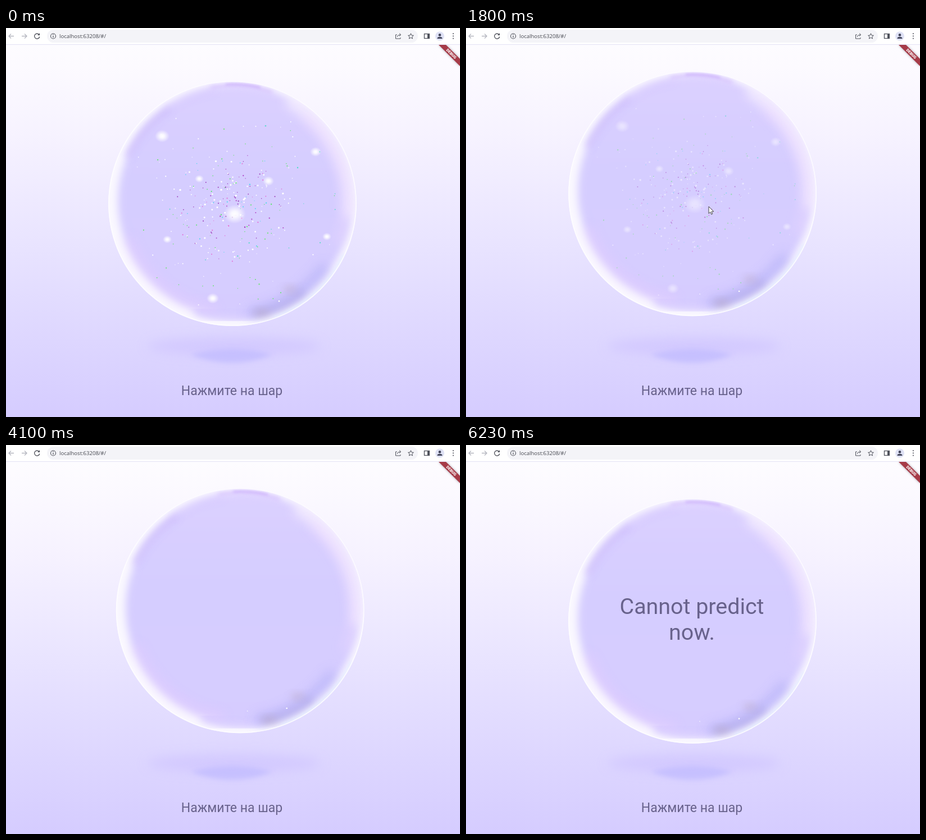
An HTML page that plays this animation: 808 by 693 pixels, repeating every 6260 ms.

```html
<!DOCTYPE html>
<html lang="ru">
<head>
<meta charset="utf-8">
<style>
html, body { margin: 0; width: 100%; height: 100%; overflow: hidden; background: #fff; }
svg { display: block; }
text { font-family: Roboto, sans-serif; }
.bar { fill: none; stroke: #50535c; stroke-width: 1.3; }
</style>
</head>
<body>
<svg width="808" height="693" viewBox="0 0 808 693">
  <defs>
    <linearGradient id="sky" x2="0" y2="1">
      <stop offset="0" stop-color="#fdfcff"/>
      <stop offset=".06" stop-color="#fcfaff"/>
      <stop offset=".25" stop-color="#f6f2ff"/>
      <stop offset=".55" stop-color="#e8e3ff"/>
      <stop offset=".8" stop-color="#ddd6ff"/>
      <stop offset="1" stop-color="#d5ccff"/>
    </linearGradient>
    <linearGradient id="body" x2="0" y2="1">
      <stop offset="0" stop-color="#dbd0ff"/>
      <stop offset=".4" stop-color="#d5cdff"/>
      <stop offset="1" stop-color="#d6ccff"/>
    </linearGradient>
    <radialGradient id="glow">
      <stop offset="0" stop-color="#fff"/>
      <stop offset=".3" stop-color="#fff" stop-opacity=".85"/>
      <stop offset="1" stop-color="#fff" stop-opacity="0"/>
    </radialGradient>
    <filter id="b2" x="-50%" y="-200%" width="200%" height="500%"><feGaussianBlur stdDeviation="2"/></filter>
    <filter id="b4" x="-60%" y="-200%" width="220%" height="500%"><feGaussianBlur stdDeviation="4"/></filter>
    <filter id="b7" x="-60%" y="-60%" width="220%" height="220%"><feGaussianBlur stdDeviation="7"/></filter>
    <filter id="b10" x="-80%" y="-100%" width="260%" height="300%"><feGaussianBlur stdDeviation="10"/></filter>
    <clipPath id="round"><circle r="220"/></clipPath>
    <clipPath id="page"><path d="M0 30H808V693H0Z"/></clipPath>
  </defs>

  <rect y="30" width="808" height="663" fill="url(#sky)"/>

  <!-- browser bar -->
  <rect width="808" height="29" fill="#fff"/>
  <rect y="29" width="808" height="1" fill="#e3e2f5"/>
  <rect x="73" y="3" width="660" height="23" rx="11.5" fill="#f4f4f8"/>
  <g class="bar">
    <path d="M14 14.5H5M9 10.5L5 14.5L9 18.5M28 14.5H37M33 10.5L37 14.5L33 18.5" stroke="#b5b6bf"/>
    <path d="M58.6 11.4A4.6 4.6 0 1 0 59.8 15.5"/>
    <path d="M60 9V13H56Z" fill="#50535c" stroke="none"/>
    <circle cx="84" cy="14.5" r="4.5" stroke-width="1.1"/>
    <path d="M84 14V17M84 11.6V12.8"/>
    <path d="M696 12H693.5V19H702V17M696 16Q697 12 702 12M700 9.5L702.8 12L700 14.5" stroke-width="1"/>
    <path d="M720.5 9.7L721.9 13L725.4 13.3L722.7 15.6L723.6 19L720.5 17.2L717.4 19L718.3 15.6L715.6 13.3L719.1 13Z" stroke-width="1"/>
    <rect x="744.5" y="10.5" width="9" height="8"/>
    <path d="M750 10H754V19H750Z" fill="#50535c" stroke="none"/>
  </g>
  <circle cx="772" cy="14.5" r="8" fill="#dfe2f5"/>
  <path d="M767.5 19Q767.5 15.7 772 15.7T776.5 19Z" fill="#42455a"/>
  <circle cx="772" cy="12.4" r="2.3" fill="#42455a"/>
  <path d="M795 9.3h1.8v1.8h-1.8zm0 4.2h1.8v1.8h-1.8zm0 4.2h1.8v1.8h-1.8z" fill="#50535c"/>
  <text x="95" y="18" fill="#45474f" style="font:9.55px 'Open Sans',sans-serif">localhost:63208/#/</text>

  <!-- shadow on the floor -->
  <ellipse cx="406" cy="567" rx="155" ry="16" fill="#cbbfff" opacity=".55" filter="url(#b10)"/>
  <path d="M328 582Q402 562 475 582Q402 611 328 582Z" fill="#c1bbff" opacity=".75" filter="url(#b4)"/>

  <g id="ball">
    <g transform="scale(1.004 .992)">
      <circle r="220" fill="#faf8ff"/>
      <g id="glass" clip-path="url(#round)" fill="none" stroke-linecap="round">
        <circle cx="5" cy="-4" r="208" fill="url(#body)" filter="url(#b7)"/>
      </g>
      <circle r="219.2" fill="none" stroke="#fff" stroke-width="1.6" opacity=".75"/>
    </g>
    <circle cx="83" cy="174" r="1.3" fill="#fff"/>
    <circle cx="13" cy="179" r=".9" fill="#fff" opacity=".7"/>
    <g id="stars"></g>
    <g id="answer" fill="#68628c" font-size="39.4" text-anchor="middle">
      <text x="-1" y="-12">Cannot predict</text>
      <text x="-1" y="34">now.</text>
    </g>
  </g>

  <text x="402" y="654" fill="#68628c" font-size="23" text-anchor="middle">Нажмите на шар</text>

  <g clip-path="url(#page)">
    <path id="band" d="M770 30H783L808 55V68Z" fill="#556" opacity=".5" filter="url(#b2)"/>
    <path d="M770 30H783L808 55V68Z" fill="#a63b48"/>
    <text transform="translate(792.7 45.8) rotate(45)" y="2.5" fill="#fff" font-size="7" font-weight="900" text-anchor="middle">DEBUG</text>
  </g>

  <path id="cursor" d="M0 0V12.5L2.9 9.8L4.7 14L6.7 13.1L4.9 9H8.8Z" fill="#fff" stroke="#333" stroke-width=".9"/>
</svg>
<script>
const LOOP = 6260, TAP = 1373, CALM = 4250, SWING = 1550;
const $ = id => document.getElementById(id);
const clamp = v => Math.min(1, Math.max(0, v));

function add(parent, tag, attrs) {
  const el = document.createElementNS('http://www.w3.org/2000/svg', tag);
  for (const k in attrs) el.setAttribute(k, attrs[k]);
  parent.append(el);
}

// Soft coloured arc inside the glass, angles in degrees
function arc(from, to, r, color, width, blur, opacity) {
  const at = a => `${r * Math.cos(a * Math.PI / 180)} ${r * Math.sin(a * Math.PI / 180)}`;
  add($('glass'), 'path', {
    d: `M${at(from)}A${r} ${r} 0 0 1 ${at(to)}`,
    stroke: color, 'stroke-width': width, filter: `url(#b${blur})`, opacity
  });
}
arc(-60, 5, 209, '#f6effe', 20, 10, .9);
arc(-50, 20, 200, '#f3dcff', 12, 10, .5);
arc(100, 160, 194, '#e8ccff', 16, 10, .45);
arc(205, 236, 204, '#c8b6fb', 9, 7, .9);
arc(236, 260, 207, '#d2c2ff', 8, 7, .6);
arc(80, 108, 205, '#cbbcff', 10, 7, .8);
arc(36, 80, 199, '#b9b5f8', 18, 10, .85);
arc(52, 78, 203, '#aea6e6', 10, 7, .75);
arc(25, 70, 217, '#e0ecff', 3, 2, .8);
arc(260, 289, 212, '#d0b8fd', 5, 4, .8);
arc(267, 283, 214, '#c5a6fb', 2.5, 2, .9);
for (const [cx, cy, rx] of [[102, 154, 12], [52, 196, 14]])
  add($('glass'), 'ellipse', { cx, cy, rx, ry: 6, fill: '#bba9c0', opacity: .5, filter: 'url(#b7)' });

// Galaxy inside the ball
let seed = 11;
const rnd = () => (seed = seed * 16807 % 2147483647) / 2147483647;
const inner = ['#fff', '#fff', '#fff', '#9a3cb8', '#b04cc8', '#e36fd6', '#55e86a', '#4fd8ee'];
const outer = ['#fff', '#fff', '#fff', '#62e86c', '#62e86c', '#4fdcc8'];
for (let i = 0; i < 300; i++) {
  const near = i < 200, tints = near ? inner : outer;
  const a = rnd() * 2 * Math.PI, d = near ? 10 + 95 * rnd() : 70 + 130 * rnd();
  const fill = tints[Math.floor(rnd() * tints.length)];
  add($('stars'), 'circle', {
    cx: d * Math.cos(a), cy: (near ? 5 : 0) + d * Math.sin(a) * .95,
    r: .6 + rnd() * (near && fill == '#fff' ? 1.2 : .6), fill
  });
}
const glows = [[-125, -120, 13], [148, -92, 10], [64, -40, 10], [-59, -44, 8],
  [-116, 64, 8], [168, 59, 8], [-35, 169, 11], [4, 19, 20]];
for (const [cx, cy, rx] of glows)
  add($('stars'), 'ellipse', { cx, cy, rx, ry: rx * .85, fill: 'url(#glow)' });

const wave = phase => (1 - Math.cos(phase)) / 2;
const rise = t => 22.5 * wave(2.17 + Math.PI * t / SWING);

function ballAt(t) {
  if (t < TAP) return [0, rise(t)];
  if (t < CALM) {
    const rest = 1 - clamp((t - TAP) / 300);
    return [14 * wave(2 * Math.PI * 2.4 * (t - TAP) / 1000), rise(TAP) * rest * rest];
  }
  return [0, 22.5 * wave(Math.PI * (t - CALM) / SWING)];
}

const path = [[700, 800, 600], [1080, 432, 318], [1950, 432, 318], [2400, 530, 413], [2600, 530, 413], [3150, 812, 640]];
function moveCursor(t) {
  const i = path.findIndex(p => p[0] > t);
  $('cursor').setAttribute('visibility', i > 0 ? 'visible' : 'hidden');
  if (i < 1) return;
  const [t0, x0, y0] = path[i - 1], [t1, x1, y1] = path[i];
  const k = wave(Math.PI * (t - t0) / (t1 - t0));
  $('cursor').setAttribute('transform', `translate(${x0 + (x1 - x0) * k} ${y0 + (y1 - y0) * k})`);
}

function draw(now) {
  const t = now % LOOP, [dx, dy] = ballAt(t);
  $('ball').setAttribute('transform', `translate(${403 + dx} ${295 + dy})`);
  $('stars').setAttribute('opacity', 1 - clamp((t - TAP) / 800));
  $('answer').setAttribute('opacity', clamp((t - CALM) / 1900));
  moveCursor(t);
  requestAnimationFrame(draw);
}
draw(performance.now());
</script>
</body>
</html>
```
